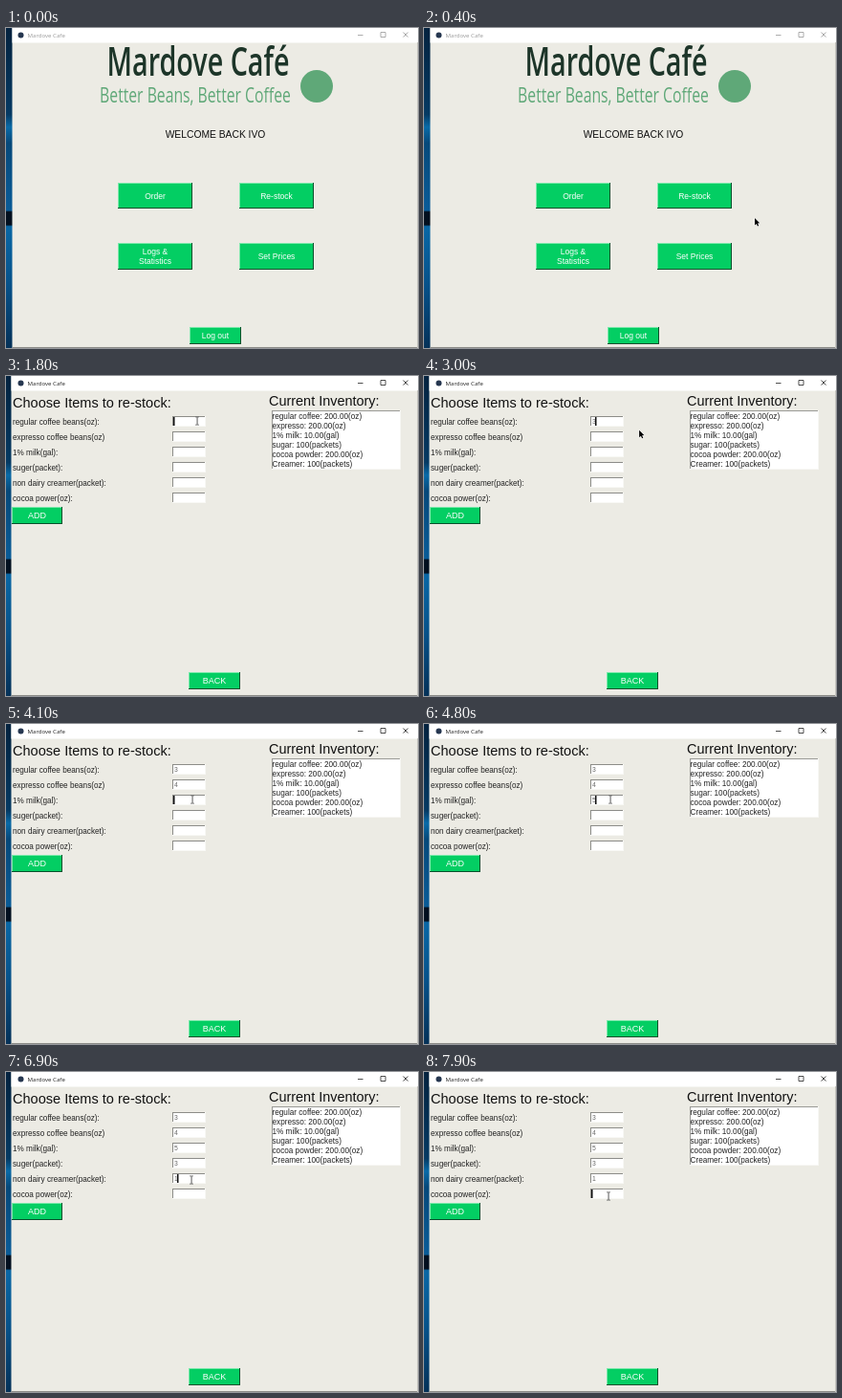
Animation, 431 px wide and 335 px high, one loop 8000 ms. Source, as an HTML page with a canvas:

```html
<!DOCTYPE html>
<html lang="en">
<head>
<meta charset="utf-8">
<title>Mardove Cafe</title>
<style>
html, body { margin: 0; width: 100%; height: 100%; overflow: hidden; background: #ecebe4; }
canvas { display: block; width: 431px; height: 335px; }
</style>
</head>
<body>
<canvas id="stage" width="431" height="335"></canvas>
<script>
const ctx = document.getElementById('stage').getContext('2d');
const LOOP = 8000;
const SANS = '"Liberation Sans", Arial, sans-serif';
const UI = '"Open Sans", sans-serif';
const PAGE = '#ecebe4', GREEN = '#03ce63';

const T = { hover: 650, active: 850, press: 1050, release: 1300, stock: 1400 };

// Each entry field: time of focus, time of typing, typed value
const fields = [
  { label: 'regular coffee beans(oz):', focus: 1700, typed: 2800, value: '3' },
  { label: 'expresso coffee beans(oz)', focus: 3200, typed: 3500, value: '4' },
  { label: '1% milk(gal):', focus: 3900, typed: 4700, value: '5' },
  { label: 'suger(packet):', focus: 5500, typed: 5800, value: '3' },
  { label: 'non dairy creamer(packet):', focus: 6400, typed: 6600, value: '1' },
  { label: 'cocoa power(oz):', focus: 7350, typed: Infinity, value: '' }
];

const inventory = [
  'regular coffee: 200.00(oz)', 'expresso: 200.00(oz)', '1% milk: 10.00(gal)',
  'sugar: 100(packets)', 'cocoa powder: 200.00(oz)', 'Creamer: 100(packets)'
];

// Pointer stops: time, x, y
const path = [
  [100, 431, 262], [400, 346, 199], [700, 319.5, 178.5], [1300, 319.5, 178.5],
  [1680, 200, 47], [2850, 200, 47], [3020, 226, 57], [3190, 200, 63],
  [3600, 200, 63], [3850, 195, 79], [4900, 195, 79], [5200, 196, 95],
  [5550, 196, 95], [5800, 194, 113], [6900, 194, 113], [7250, 193, 130]
];

function rect(x, y, w, h, color) {
  ctx.fillStyle = color;
  ctx.fillRect(x, y, w, h);
}

function dot(x, y, r, color) {
  ctx.fillStyle = color;
  ctx.beginPath();
  ctx.arc(x, y, r, 0, Math.PI * 2);
  ctx.fill();
}

function text(str, x, y, size, color = '#111', align = 'left', family = SANS, weight = 400) {
  ctx.font = `${weight} ${size}px ${family}`;
  ctx.textAlign = align;
  ctx.fillStyle = color;
  ctx.fillText(str, x, y);
}

function bevel(x, y, w, h, fill, light, dark) {
  rect(x, y, w, h, dark);
  rect(x, y, w - 1, h - 1, light);
  rect(x + 1, y + 1, w - 2, h - 2, fill);
}

function button(x, y, w, h, lines, size = 8.5, state = 'normal') {
  const down = state === 'down', plain = state === 'normal';
  if (plain) bevel(x, y, w, h, GREEN, '#7be9ab', '#07502c');
  else bevel(x, y, w, h, '#ebeeee', down ? '#6b6b6b' : '#fff', down ? '#fff' : '#6b6b6b');
  const shift = down ? 0.7 : 0;
  const base = y + h / 2 + size * 0.36 - (lines.length - 1) * 5;
  lines.forEach((line, i) =>
    text(line, x + w / 2 + shift, base + i * 10, size, plain ? '#fff' : '#222', 'center'));
}

function desktop() {
  const g = ctx.createLinearGradient(0, 0, 0, 335);
  [[0, '#04233f'], [0.27, '#063a63'], [0.31, '#0a6ba8'], [0.36, '#07497a'], [0.57, '#0a5c98'],
   [0.575, '#03101f'], [0.615, '#03101f'], [0.62, '#0a68a6'], [0.8, '#07528a'], [1, '#053158']]
    .forEach(([p, c]) => g.addColorStop(p, c));
  rect(0, 0, 7, 335, g);
}

function frame(left, active) {
  rect(left, 0, 431 - left, 335, PAGE);
  rect(left, 0, 431 - left, 15.5, '#fff');
  const ink = active ? '#222' : '#999';
  dot(15.5, 7.5, 3, '#25364f');
  text('Mardove Cafe', 22.5, 10, 6.1, ink, 'left', UI);
  ctx.strokeStyle = ink;
  ctx.lineWidth = 0.8;
  ctx.beginPath();
  ctx.moveTo(368, 7.5);
  ctx.lineTo(373.5, 7.5);
  ctx.rect(392, 4.5, 5, 5);
  ctx.moveTo(415.5, 4.5);
  ctx.lineTo(420.5, 9.5);
  ctx.moveTo(420.5, 4.5);
  ctx.lineTo(415.5, 9.5);
  ctx.stroke();
  rect(left, 334, 431 - left, 1, '#8d8d89');
  rect(430, 15, 1, 320, '#c9c8c2');
}

function banner() {
  // The banner art is set in a narrow aspect
  ctx.save();
  ctx.scale(0.7, 1);
  text('Mardove Café', 201 / 0.7, 50, 41, '#1d3529', 'center', UI, 600);
  text('Better Beans, Better Coffee', 198 / 0.7, 78, 22.5, '#5fa878', 'center', UI);
  ctx.restore();
  dot(325, 61, 17, '#5fa878');
}

function menuPage(t) {
  frame(6.5, t >= T.active);
  banner();
  text('WELCOME BACK IVO', 219, 115, 10.3, '#111', 'center');
  const state = t < T.hover ? 'normal' : t >= T.press && t < T.release ? 'down' : 'hover';
  button(117, 162, 78, 27, ['Order']);
  button(244, 162, 78, 27, ['Re-stock'], 8.5, state);
  button(117, 225, 78, 28, ['Logs &', 'Statistics']);
  button(244, 225, 78, 28, ['Set Prices']);
  button(192, 313, 54, 18, ['Log out']);
}

function entry(f, i, t) {
  const y = 42 + i * 16;
  text(f.label, 7, y + 8.5, 8.2, '#222');
  bevel(174, y, 35, 11, '#fff', '#8c8c88', '#f8f8f5');
  const filled = t >= f.typed;
  if (filled) text(f.value, 176, y + 8, 6.8, '#666');
  const next = fields[i + 1];
  const focused = t >= f.focus && (!next || t < next.focus);
  const since = t - (filled ? f.typed : f.focus);
  if (focused && since % 900 < 600) rect(filled ? 179 : 175, y + 1, 1.5, 9, '#111');
}

function stockPage(t) {
  frame(5.5, true);
  text('Choose Items to re-stock:', 7, 33, 14.55);
  text('Current Inventory:', 275, 31, 14.45);
  fields.forEach((f, i) => entry(f, i, t));
  bevel(278, 36, 135, 62, '#fff', '#9a9a96', '#f8f8f5');
  inventory.forEach((line, i) => text(line, 278.5, 45 + i * 10, 8.2, '#222'));
  button(6, 137, 53, 18, ['ADD'], 9);
  button(191, 310, 54, 18, ['BACK'], 9);
}

function pointerAt(t) {
  let i = 0;
  while (i < path.length - 1 && t >= path[i + 1][0]) i++;
  const a = path[i], b = path[i + 1] || a;
  const k = b === a ? 0 : (t - a[0]) / (b[0] - a[0]);
  const e = k * k * (3 - 2 * k);
  return [a[1] + (b[1] - a[1]) * e, a[2] + (b[2] - a[2]) * e];
}

function polygon(points) {
  ctx.beginPath();
  points.forEach(([x, y]) => ctx.lineTo(x, y));
  ctx.closePath();
}

function pointer(t) {
  if (t < path[0][0]) return;
  const [x, y] = pointerAt(t);
  const row = (y - 42) / 16;
  const inEntry = t >= T.stock && x > 174 && x < 209 && row >= 0 && row < 6 && row % 1 < 0.7;
  ctx.save();
  ctx.translate(x, y);
  if (inEntry) {
    rect(-0.4, -4, 0.9, 8, '#444');
    rect(-2, -4.5, 4, 0.8, '#666');
    rect(-2, 3.7, 4, 0.8, '#666');
  } else {
    polygon([[0, 0], [0, 7.6], [1.8, 6], [3, 8.6], [4.2, 8], [3, 5.5], [5.2, 5.3]]);
    ctx.strokeStyle = '#fff';
    ctx.lineWidth = 0.9;
    ctx.stroke();
    ctx.fillStyle = '#000';
    ctx.fill();
  }
  ctx.restore();
}

function draw(now) {
  const t = now % LOOP;
  desktop();
  if (t < T.stock) menuPage(t);
  else stockPage(t);
  pointer(t);
  requestAnimationFrame(draw);
}

requestAnimationFrame(draw);
</script>
</body>
</html>
```
